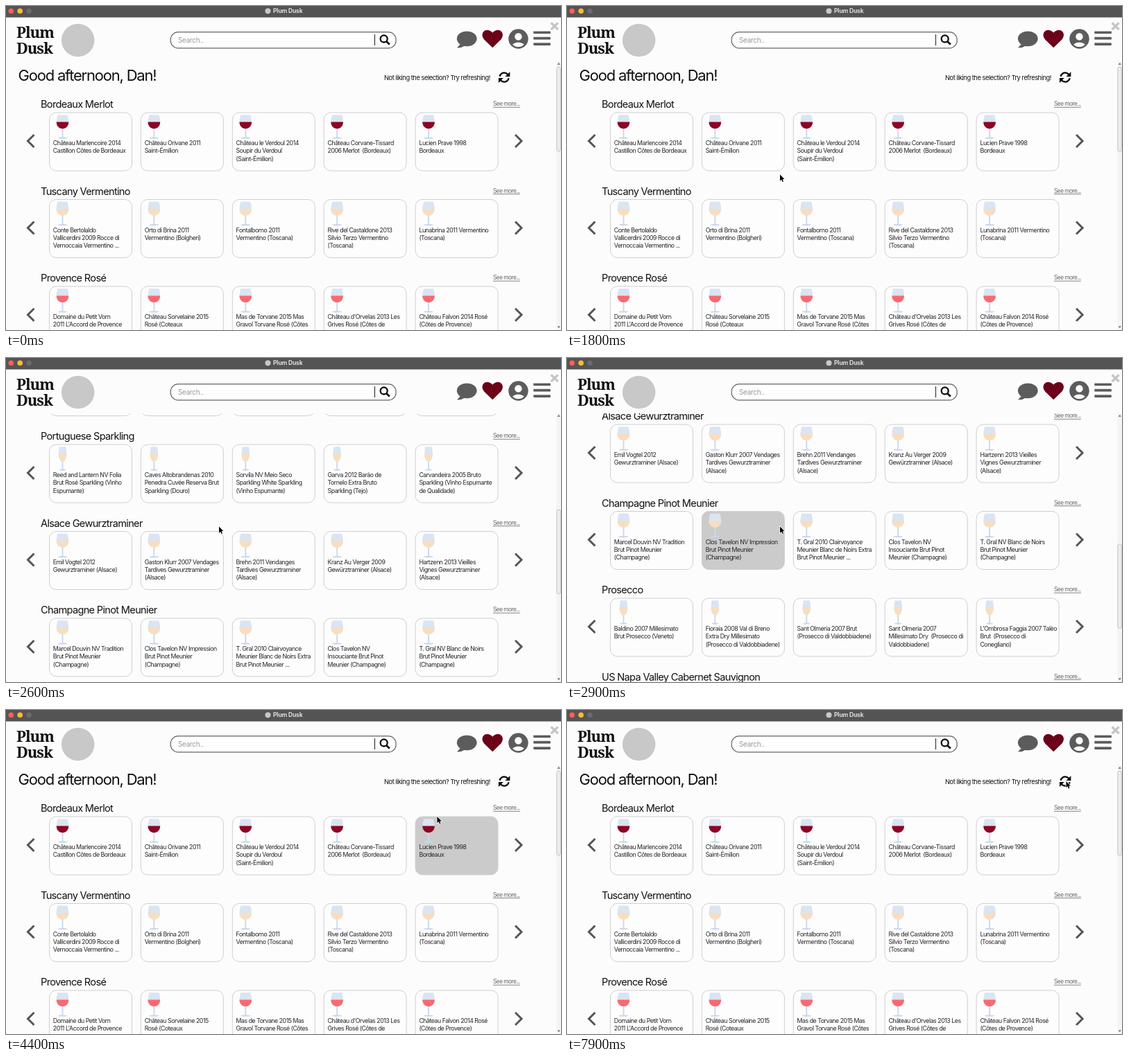
Recreate the animation shown at these times as an HTML page with a canvas. Size 800 px wide and 468 px high, loop 8 s.

```html
<!DOCTYPE html>
<html lang="en">
<head>
<meta charset="utf-8">
<title>Plum Dusk</title>
<style>
html, body { margin: 0; width: 100%; height: 100%; overflow: hidden; background: #fdfcfd; }
canvas { display: block; width: 800px; height: 468px; }
</style>
</head>
<body>
<canvas id="stage"></canvas>
<script>
const W = 800, H = 468, LOOP = 8000, STEP = 100;
const TOP = 80, PITCH = 125.5, CARD_W = 119, CARD_H = 84, CARD_GAP = 131.9;
const SANS = 'Inter, "Open Sans", sans-serif';
const PAPER = '#fdfcfd', GREY = '#5c5c5c';
const RED = '#8c0423', WHITE = '#f8dec0', ROSE = '#fc6870';

const canvas = document.getElementById('stage');
const c = canvas.getContext('2d');
const dpr = window.devicePixelRatio || 1;
canvas.width = W * dpr;
canvas.height = H * dpr;

const sections = [
  { title: 'Bordeaux Merlot', wine: RED, cards: [
    'Château Marlencoire 2014|Castillon Côtes de Bordeaux',
    'Château Orivane 2011|Saint-Émilion',
    'Château le Verdoul 2014|Soupir du Verdoul|(Saint-Émilion)',
    'Château Corvane-Tissard|2006 Merlot  (Bordeaux)',
    'Lucien Prave 1998|Bordeaux'] },
  { title: 'Tuscany Vermentino', wine: WHITE, cards: [
    'Conte Bertolaldo|Vallicerdini 2009 Rocce di|Vernoccaia Vermentino ...',
    'Orto di Brina 2011|Vermentino (Bolgheri)',
    'Fontalborno 2011|Vermentino (Toscana)',
    'Rive del Castaldone 2013|Silvio Terzo Vermentino|(Toscana)',
    'Lunabrina 2011 Vermentino|(Toscana)'] },
  { title: 'Provence Rosé', wine: ROSE, cards: [
    'Domaine du Petit Vorn|2011 L\'Accord de Provence|(Côtes de Provence)',
    'Château Sorvelaine 2015|Rosé (Coteaux|d\'Aix-en-Provence)',
    'Mas de Torvane 2015 Mas|Gravol Torvane Rosé (Côtes|de Provence)',
    'Château d\'Orvelas 2013 Les|Grives Rosé (Côtes de|Provence)',
    'Château Falvon 2014 Rosé|(Côtes de Provence)'] },
  { title: 'Portuguese Sparkling', wine: WHITE, flute: true, cards: [
    'Reed and Lantern NV Folia|Brut Rosé Sparkling (Vinho|Espumante)',
    'Caves Altobrandenas 2010|Penedra Cuvée Reserva Brut|Sparkling (Douro)',
    'Sorvila NV Meio Seco|Sparkling White Sparkling|(Vinho Espumante)',
    'Garva 2012 Barão de|Tornelo Extra Bruto|Sparkling (Tejo)',
    'Carvandeira 2005 Bruto|Sparkling (Vinho Espumante|de Qualidade)'] },
  { title: 'Alsace Gewurztraminer', wine: WHITE, cards: [
    'Emil Vogtel 2012|Gewurztraminer (Alsace)',
    'Gaston Klurr 2007 Vendages|Tardives Gewurztraminer|(Alsace)',
    'Brehn 2011 Vendanges|Tardives Gewurztraminer|(Alsace)',
    'Kranz Au Verger 2009|Gewürztraminer (Alsace)',
    'Hartzenn 2013 Vieilles|Vignes Gewurztraminer|(Alsace)'] },
  { title: 'Champagne Pinot Meunier', wine: WHITE, cards: [
    'Marcel Douvin NV Tradition|Brut Pinot Meunier|(Champagne)',
    'Clos Tavelon NV Impression|Brut Pinot Meunier|(Champagne)',
    'T. Gral 2010 Clairvoyance|Meunier Blanc de Noirs Extra|Brut Pinot Meunier ...',
    'Clos Tavelon NV|Insouciante Brut Pinot|Meunier (Champagne)',
    'T. Gral NV Blanc de Noirs|Brut Pinot Meunier|(Champagne)'] },
  { title: 'Prosecco', wine: WHITE, flute: true, cards: [
    'Baldino 2007 Millesimato|Brut Prosecco (Veneto)',
    'Fioraia 2008 Val di Breno|Extra Dry Millesimato|(Prosecco di Valdobbiadene)',
    'Sant Olmeria 2007 Brut|(Prosecco di Valdobbiadene)',
    'Sant Olmeria 2007|Millesimato Dry  (Prosecco di|Valdobbiadene)',
    'L\'Ombrosa Faggia 2007 Talèo|Brut  (Prosecco di|Conegliano)'] },
  { title: 'US Napa Valley Cabernet Sauvignon', wine: RED, cards: [
    'Quoll 2013 Estate Cabernet|Sauvignon (Napa Valley)',
    'Bramwater 2006 Cabernet|Sauvignon (Napa Valley)',
    'Hurst-Pellman 2007|Cabernet Sauvignon (Napa|Valley)',
    'Plumbline 2013 Nell\'s Bluff|Cabernet Sauvignon (Napa|Valley)',
    'Tellum 2013 Nine Rock|Cascade Cabernet|Sauvignon (Napa Valley)'] }
];

// time, scroll offset
const scrollKeys = [[1800, 0], [1900, 6], [2000, 45], [2600, 405.5], [2900, 560], [3200, 628],
  [3300, 628], [3400, 621.5], [3600, 500], [3900, 150], [4100, 15], [4200, 0]];
// time, x, y
const mouseKeys = [[900, 330, 490], [1500, 308, 246], [1800, 307, 243.5], [4150, 307, 243.5],
  [4400, 621.5, 154], [4900, 717, 104], [7800, 717, 104], [7900, 719.5, 103]];

function at(keys, t, ease = k => k) {
  if (t <= keys[0][0]) return keys[0].slice(1);
  for (let i = 1; i < keys.length; i++) {
    const a = keys[i - 1], b = keys[i];
    if (t <= b[0]) {
      const k = ease((t - a[0]) / (b[0] - a[0]));
      return a.slice(1).map((v, j) => v + (b[j + 1] - v) * k);
    }
  }
  return keys[keys.length - 1].slice(1);
}
const smooth = k => k * k * (3 - 2 * k);

function text(s, x, y, size, color = '#1c1c1c', weight = 400, spacing = -0.055, family = SANS) {
  c.font = `${weight} ${size}px ${family}`;
  c.letterSpacing = `${size * spacing}px`;
  c.fillStyle = color;
  c.fillText(s, x, y);
  return c.measureText(s).width;
}

function box(x, y, w, h, r, fill, stroke, line = 1) {
  c.beginPath();
  c.roundRect(x, y, w, h, r);
  if (fill) { c.fillStyle = fill; c.fill(); }
  if (stroke) { c.strokeStyle = stroke; c.lineWidth = line; c.stroke(); }
}

function oval(x, y, rx, ry, fill) {
  c.beginPath();
  c.ellipse(x, y, rx, ry, 0, 0, 7);
  c.fillStyle = fill;
  c.fill();
}
const disc = (x, y, r, fill) => oval(x, y, r, r, fill);

function lines(points, color, width) {
  c.beginPath();
  points.forEach(([x, y]) => c.lineTo(x, y));
  c.strokeStyle = color;
  c.lineWidth = width;
  c.stroke();
}

function shape(points, fill, stroke, width) {
  c.beginPath();
  points.forEach(([x, y]) => c.lineTo(x, y));
  c.closePath();
  if (stroke) { c.strokeStyle = stroke; c.lineWidth = width; c.stroke(); }
  c.fillStyle = fill;
  c.fill();
}

function glass(x, y, wine, flute) {
  const r = flute ? 5.8 : 8.8, rim = flute ? 4.6 : 7, deep = flute ? 21.5 : 20;
  c.save();
  c.translate(x, y);
  c.fillStyle = '#c9d7ec';
  c.fillRect(-0.9, deep - 1, 1.8, 34 - deep);
  oval(0, 33.4, flute ? 5 : 7, 1.2, '#c9d7ec');
  c.beginPath();
  c.moveTo(-rim, 0);
  c.lineTo(rim, 0);
  c.quadraticCurveTo(r, 6, r, 10.5);
  c.bezierCurveTo(r, 16, r * 0.55, deep, 0, deep);
  c.bezierCurveTo(-r * 0.55, deep, -r, 16, -r, 10.5);
  c.quadraticCurveTo(-r, 6, -rim, 0);
  c.fillStyle = '#dae4f3';
  c.fill();
  c.clip();
  c.fillStyle = wine;
  c.fillRect(-10, 10.3, 20, 12);
  c.restore();
}

function chevron(x, y, dir) {
  lines([[x - 4.5 * dir, y - 9], [x + 4.5 * dir, y], [x - 4.5 * dir, y + 9]], '#555', 3);
}

function section(s, y, mouse) {
  text(s.title, 50, y + 5, 14.6, '#111', 400, -0.047);
  const w = text('See more...', 702, y + 2.3, 8.4, '#666', 400, -0.065);
  c.fillRect(702, y + 3.8, w, 0.8);
  chevron(36, y + 53, -1);
  chevron(738.6, y + 53, 1);
  s.cards.forEach((label, i) => {
    const x = 62.5 + i * CARD_GAP, top = y + 12;
    const over = mouse.x >= x && mouse.x <= x + CARD_W && mouse.y >= top - 0.5 && mouse.y <= top + CARD_H;
    box(x, top, CARD_W, CARD_H, 10, over ? '#cbcbcb' : '#fdfdfd', '#cfcfcf');
    glass(x + 19, top + 3.2, s.wine, s.flute);
    label.split('|').forEach((row, n) => text(row, x + 5.3, top + 47 + n * 11.25, 8.8, '#262626'));
  });
}

function refresh(x, y) {
  c.save();
  c.translate(x, y);
  for (let i = 0; i < 2; i++) {
    c.beginPath();
    c.arc(0, 0, 6.6, Math.PI * 1.06, Math.PI * 1.8);
    c.strokeStyle = '#0a0a0a';
    c.lineWidth = 2.3;
    c.stroke();
    shape([[8.2, -8], [8.2, -1], [1.4, -1]], '#0a0a0a');
    c.rotate(Math.PI);
  }
  c.restore();
}

function titleBar() {
  c.fillStyle = '#555454';
  c.fillRect(0, 0, W, 16.5);
  ['#fd5f57', '#febc2e', '#6c6b6b'].forEach((col, i) => disc(7.3 + i * 12.9, 7.2, 3.8, col));
  disc(377.5, 7.2, 4, '#c8c8c8');
  text('Plum Dusk', 385, 10.3, 8.5, '#dedede', 700, -0.02);
}

function header() {
  c.fillStyle = PAPER;
  c.fillRect(0, 16, W, TOP - 16);
  const serif = '"Noto Serif", serif';
  text('Plum', 15, 46, 22, '#111', 900, -0.05, serif);
  text('Dusk', 15, 69, 22, '#111', 900, -0.05, serif);
  disc(103.7, 49.5, 23.8, '#c8c8c8');

  box(237.2, 37.7, 325, 23.2, 11, '#fefefe', '#666', 1.2);
  text('Search..', 248, 53, 10, '#9a9a9a', 400, -0.03);
  lines([[531.5, 41], [531.5, 57]], '#333', 1.2);
  c.beginPath();
  c.arc(544.7, 47.4, 5, 0, 7);
  c.strokeStyle = '#0a0a0a';
  c.lineWidth = 2.3;
  c.stroke();
  lines([[548, 50.7], [552.8, 55.5]], '#0a0a0a', 2.8);

  oval(664.3, 47.3, 14.4, 10.9, GREY);
  shape([[652, 51], [655, 55], [650, 60.5], [656, 60], [662, 57]], GREY);

  c.fillStyle = '#6b0217';
  c.beginPath();
  c.moveTo(701.3, 60.2);
  c.lineTo(689, 48.2);
  c.bezierCurveTo(681.5, 38.5, 693, 29.5, 701.3, 38.6);
  c.bezierCurveTo(709.6, 29.5, 721.1, 38.5, 713.6, 48.2);
  c.fill();

  disc(738.5, 47.5, 14.2, GREY);
  c.save();
  c.beginPath();
  c.arc(738.5, 47.5, 11.6, 0, 7);
  c.clip();
  oval(738.5, 59, 9.5, 6.6, PAPER);
  c.restore();
  disc(738.5, 44.2, 6.2, GREY);
  disc(738.5, 44.2, 5.2, PAPER);

  for (let i = 0; i < 3; i++) box(760.3, 36.4 + i * 8.4, 24.6, 3.7, 0.8, GREY);
  lines([[785.7, 24.2], [795.6, 34]], '#c6c6c6', 3.4);
  lines([[795.6, 24.2], [785.7, 34]], '#c6c6c6', 3.4);
}

function scrollBar(offset) {
  box(793.4, TOP, 6.6, H - TOP, 0, '#f4f4f4');
  box(793.9, 88.3 + offset / 3.1, 5.4, 121.5, 2.5, '#eeeeee', '#bdbdbd', 0.9);
  shape([[794.6, 84.8], [796.8, 82], [799, 84.8]], '#707070');
  shape([[794.6, 462.5], [796.8, 465.3], [799, 462.5]], '#707070');
}

function arrow(x, y) {
  c.save();
  c.translate(x, y);
  shape([[0, 0], [0, 9.2], [2.1, 7.3], [3.6, 10.6], [5, 9.9], [3.7, 6.8], [6.4, 6.5]], '#000', '#fff', 1.4);
  c.restore();
}

function hand(x, y) {
  c.save();
  c.translate(x, y);
  c.lineJoin = 'round';
  shape([[0, 0], [1.7, 0], [2, 3.6], [7, 4.6], [7, 7.6], [5.6, 10.2], [0.4, 10.2], [-3, 6], [-2, 5], [0, 6.4]],
    '#fff', '#111', 1.7);
  lines([[2.2, 7], [2.2, 9]], '#111', 0.6);
  lines([[4, 7], [4, 9]], '#111', 0.6);
  c.restore();
}

function draw(t) {
  const [offset] = at(scrollKeys, t);
  const [x, y] = at(mouseKeys, t, smooth);
  const mouse = { x, y: y < H ? y + offset : Infinity };
  c.setTransform(dpr, 0, 0, dpr, 0, 0);
  c.fillStyle = PAPER;
  c.fillRect(0, 0, W, H);

  c.save();
  c.beginPath();
  c.rect(0, TOP, W, H - TOP);
  c.clip();
  c.translate(0, -offset);
  text('Good afternoon, Dan!', 17.5, 107.5, 22, '#111');
  text('Not liking the selection? Try refreshing!', 545, 106.8, 9.3, '#111', 400, -0.05);
  refresh(718.2, 103);
  sections.forEach((s, i) => {
    const top = 142 + i * PITCH;
    if (top - offset < H + 20 && top + 110 - offset > TOP) section(s, top, mouse);
  });
  c.restore();

  header();
  scrollBar(offset);
  titleBar();

  const onButton = x > 710 && y < 112 && t < 7900;
  (onButton ? hand : arrow)(x, y);
}

function tick(now) {
  draw(Math.floor(now % LOOP / STEP) * STEP);
  requestAnimationFrame(tick);
}
requestAnimationFrame(tick);
</script>
</body>
</html>
```
